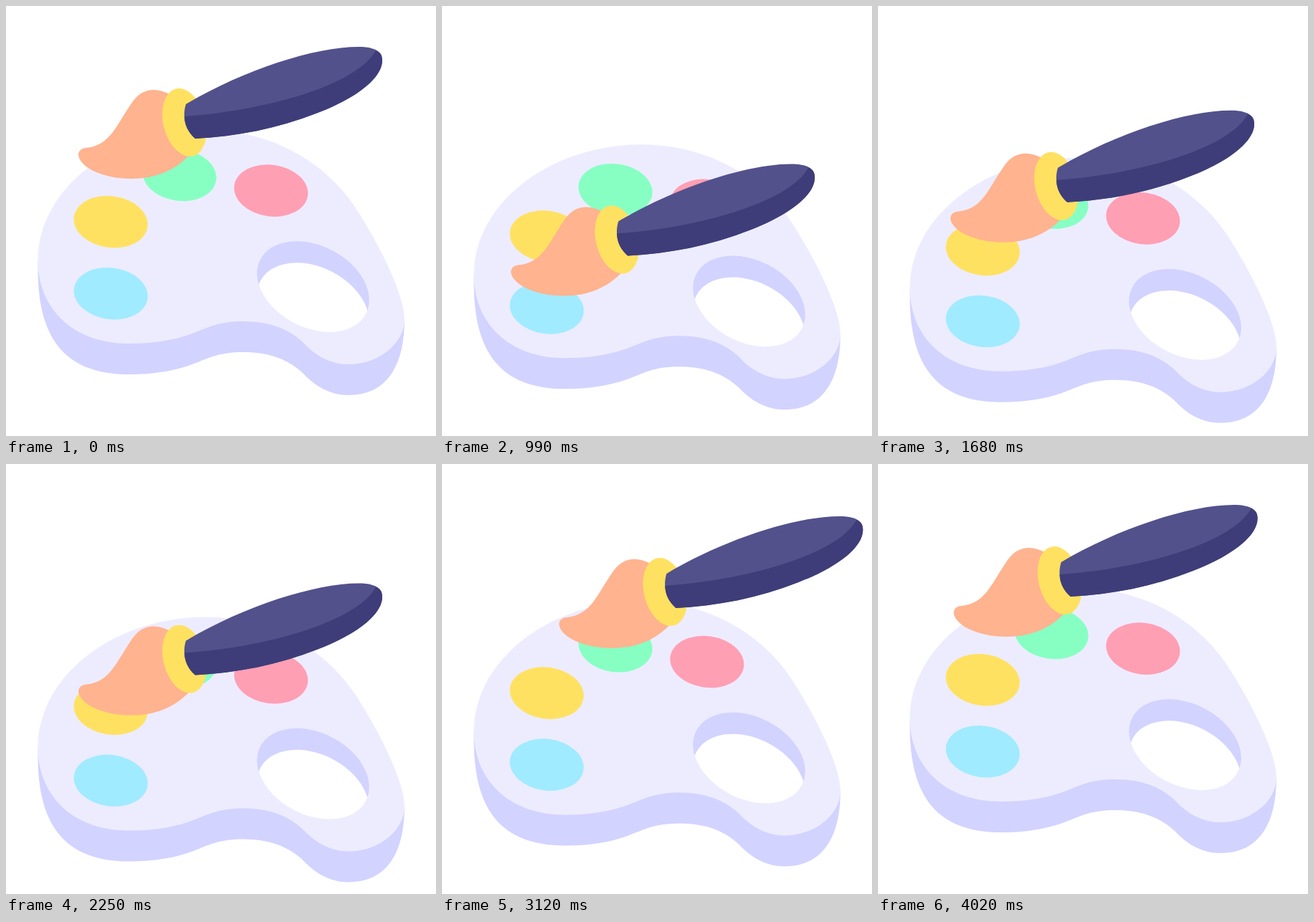
An HTML page for the animation above (4.05 s loop, 600x600 px).

```html
<!DOCTYPE html>
<html lang="en">
<head>
<meta charset="utf-8">
<title>Paint palette</title>
<style>
  html, body { margin: 0; width: 100%; height: 100%; overflow: hidden; background: #fff; }
  svg { display: block; width: 100%; height: 100%; }
</style>
</head>
<body>
<svg viewBox="0 0 600 600">
  <defs>
    <ellipse id="well" rx="51.8" ry="35.9" transform="rotate(8)"/>
    <ellipse id="hole" rx="82.9" ry="57.3" transform="translate(428.5 391.7) rotate(27.1)"/>
    <clipPath id="holeClip"><use href="#hole"/></clipPath>
  </defs>

  <g id="palette">
    <path id="side" fill="#d2d3ff"/>
    <path id="face" fill="#edecff"/>
    <use href="#well" transform="translate(146.2 301.2)" fill="#ffe161"/>
    <use href="#well" transform="translate(242 235.9)" fill="#87ffc3"/>
    <use href="#well" transform="translate(369.8 257.6)" fill="#ff9fb4"/>
    <use href="#well" transform="translate(146.2 401.2)" fill="#a0ebff"/>
    <use href="#hole" fill="#d2d3ff"/>
    <g clip-path="url(#holeClip)"><use href="#hole" y="30" fill="#fff"/></g>
  </g>

  <g id="brush">
    <path fill="#ffb38f" d="M101 208C101 203 104 199 111 198C146 195 153 167 177 133C191 114 210 113 230 124L256 208C235 230 208 241 175 241C135 241 103 225 101 208Z"/>
    <ellipse rx="29.5" ry="48.4" fill="#ffe161" transform="translate(249 162.5) rotate(-14.4)"/>
    <path fill="#52518c" d="M251 137C330 90 430 57 492 57C516 57 525 64 525 76C525 102 485 130 435 149C379 171 322 182 264 185C249 172 246 153 251 137Z"/>
    <path fill="#3e3d79" d="M249 154C365 146 490 110 516 62C522 64 525 68 525 76C525 102 485 130 435 149C379 171 322 182 264 185C254 176 249 166 249 154Z"/>
  </g>
</svg>
<script>
const LOOP = 4050, STEP = 30;
const DAB = LOOP / 3, ARRIVE = 455, LEAVE = 905;
const SINK = 42, TILT = 6.9;

// Each stop: where the brush dabs, and the bend of the way there.
const stops = [
  { x: -6, y: 177, bendX: -3, bendY: 88.5 },
  { x: 0, y: 69, bendX: 0, bendY: 34.5 },
  { x: 68, y: 0, bendX: 31, bendY: -18 }
];

const byId = id => document.getElementById(id);
const smooth = p => p * p * (3 - 2 * p);
// Rises from 0 to 1 and falls back as p runs from 0 to 1.
const swing = p => smooth(1 - Math.abs(2 * p - 1));
const curve = (bend, end, p) => 2 * p * (1 - p) * bend + p * p * end;

// The wavy front, shared by the upper and lower rim; the ends differ.
const wave = "c-26 0-47-13-62-29c-20-20-48-31-84-31s-48 8-72 17s-54 14-88 14";
byId("side").setAttribute("d",
  `M556 437c0 76-33 106-78 106${wave}C84 514 44.5 466 44.5 367V355z`);
byId("face").setAttribute("d",
  "M44.5 355C44.5 254 152 173 278 173C375 173 450 222 490 285C525 340 556 405 556 437" +
  `c0 34-36 63-78 63${wave}C90 471 44.5 419 44.5 355z`);

function brushPose(t) {
  const stop = stops[Math.floor(t / DAB)];
  const local = t % DAB;
  if (local < ARRIVE) {
    const p = local / ARRIVE;
    return { x: curve(stop.bendX, stop.x, p), y: curve(stop.bendY, stop.y, p), tilt: 0 };
  }
  if (local < LEAVE) {
    const p = (local - ARRIVE) / (LEAVE - ARRIVE);
    return { x: stop.x, y: stop.y, tilt: TILT * swing(p) };
  }
  const left = (DAB - local) / (DAB - LEAVE);
  return { x: stop.x * left, y: stop.y * left, tilt: 0 };
}

function draw(t) {
  const sink = SINK * swing(t / LOOP);
  const { x, y, tilt } = brushPose(t);
  byId("palette").setAttribute("transform", `translate(0 ${sink})`);
  byId("brush").setAttribute("transform",
    `translate(${x} ${y + sink}) rotate(${-tilt} 525 42)`);
}

const start = performance.now();
function tick() {
  const t = (performance.now() - start) % LOOP;
  draw(Math.floor(t / STEP) * STEP);
  requestAnimationFrame(tick);
}
tick();
</script>
</body>
</html>
```
